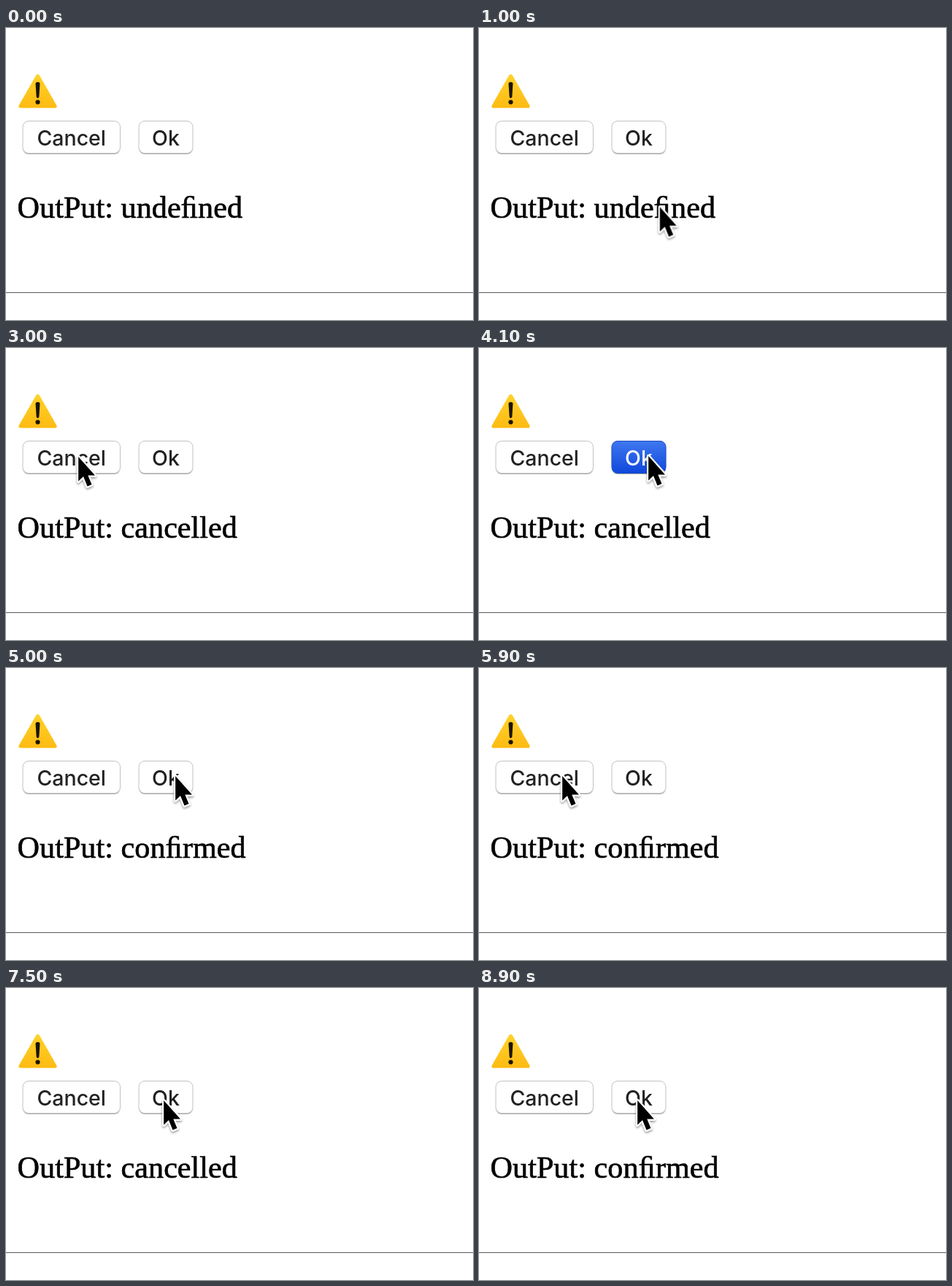
These frames come from a looping animation (640x400 px, 9500 ms). An HTML page:

```html
<!DOCTYPE html>
<html lang="en">
<head>
<meta charset="utf-8">
<title>Cancel / Ok demo</title>
<style>
  html, body { margin: 0; width: 100%; height: 100%; overflow: hidden; background: #fff; }
  svg { display: block; }
  .label { font: 500 28.5px Inter, sans-serif; text-anchor: middle; fill: #222; }
  .face { fill: #fff; stroke: #c2c2c2; }
  .edge { fill: #b2b2b2; }
  .down { opacity: 0; }
  .down rect { fill: url(#blue); stroke: #1a4fc4; }
  .down .label { fill: #fff; }
  .out { font: 42.2px "Liberation Serif", Times, serif; fill: #050505; stroke: #050505; stroke-width: .7px; }
  .word { opacity: 0; }
</style>
</head>
<body>
<svg width="640" height="400" viewBox="0 0 640 400">
  <defs>
    <linearGradient id="blue" x2="0" y2="1">
      <stop stop-color="#3f78f0"/><stop offset="1" stop-color="#1047dc"/>
    </linearGradient>
    <linearGradient id="amber" x2="0" y2="1">
      <stop stop-color="#ffd22c"/><stop offset="1" stop-color="#fdbb12"/>
    </linearGradient>
    <filter id="shade" x="-50%" y="-50%" width="200%" height="200%">
      <feDropShadow dx="0" dy="2" stdDeviation="1.6" flood-opacity=".4"/>
    </filter>
  </defs>

  <path d="M41 65Q43.500 61.500 46 65L69 105.500Q71 109.500 67 109.500H20Q16 109.500 18 105.500Z" fill="url(#amber)"/>
  <path d="M40.500 76.500Q40.500 74 43.500 74T46.500 76.500L45.400 94Q45.200 96 43.500 96T41.600 94Z" fill="#1c1503"/>
  <circle cx="43.500" cy="101.500" r="3.100" fill="#1c1503"/>

  <g id="buttons"></g>

  <text class="out" x="15.600" y="260">OutPut:</text>
  <g id="words"></g>
  <path d="M0 362.500H640" stroke="#5a5a5a"/>

  <g id="cursor">
    <path d="M1.200 2V35.500L8 29L13.500 42.500L19.500 40L14.300 27.500H24Z" filter="url(#shade)"
      stroke="#fff" stroke-width="4.400" stroke-linejoin="round" paint-order="stroke"/>
  </g>
</svg>
<script>
const LOOP = 9500, STEP = 100;
const NS = "http://www.w3.org/2000/svg";
const $ = id => document.getElementById(id);

// Cursor legs: start, end, from, to, easing
const easeOut = k => 1 - (1 - k) ** 2.5;
const easeBoth = k => k * k * (3 - 2 * k);
const legs = [
  [900, 1500, [329, 296], [104, 152], easeOut],
  [1500, 1800, [104, 152], [98, 147], easeOut],
  [3000, 3600, [98, 147], [231, 146], easeBoth],
  [5300, 5700, [231, 146], [113, 146], easeBoth],
  [7100, 7500, [113, 147], [215, 152], easeBoth],
  [7500, 7600, [215, 152], [216, 152], easeOut],
];
const presses = {
  Cancel: [[1900, 2000], [6100, 6400]],
  Ok: [[4000, 4200], [7900, 8200]],
};
const words = {
  undefined: [[0, 2000]],
  cancelled: [[2000, 4200], [6400, 8200]],
  confirmed: [[4200, 6400], [8200, LOOP]],
};

function cursorAt(t) {
  const leg = legs.filter(l => l[0] <= t).pop();
  if (!leg) return { opacity: 0, transform: "translate(329px, 296px)" };
  const [start, end, from, to, ease] = leg;
  const k = ease(Math.min(1, (t - start) / (end - start)));
  const [x, y] = from.map((v, i) => v + (to[i] - v) * k);
  return { opacity: 1, transform: `translate(${x}px, ${y}px)` };
}

const during = spans => t => ({ opacity: +spans.some(([a, b]) => t >= a && t < b) });

// Samples a pose on the ten-per-second grid and loops it with hard steps
function play(el, pose) {
  const frames = [];
  for (let t = 0; t < LOOP; t += STEP)
    frames.push({ ...pose(t), offset: t / LOOP, easing: "step-end" });
  frames.push({ ...pose(LOOP - STEP), offset: 1 });
  el.animate(frames, { duration: LOOP, iterations: Infinity });
}

function addButton(name, x, width) {
  const g = document.createElementNS(NS, "g");
  const box = `x="${x}" y="127.500" width="${width}" height="44" rx="8"`;
  const text = `<text class="label" x="${x + width / 2}" y="161">${name}</text>`;
  g.innerHTML = `<rect class="edge" x="${x}" y="129" width="${width}" height="44" rx="8"/>
    <rect class="face" ${box}/>${text}
    <g class="down"><rect ${box}/>${text}</g>`;
  $("buttons").append(g);
  play(g.querySelector(".down"), during(presses[name]));
}

function addWord(word) {
  const el = document.createElementNS(NS, "text");
  el.setAttribute("class", "out word");
  el.setAttribute("x", 157.6);
  el.setAttribute("y", 260);
  el.textContent = word.replace("fi", "\ufb01"); // typographic ligature
  $("words").append(el);
  play(el, during(words[word]));
}

addButton("Cancel", 23, 133.5);
addButton("Ok", 182, 74);
Object.keys(words).forEach(addWord);
play($("cursor"), cursorAt);
</script>
</body>
</html>
```
